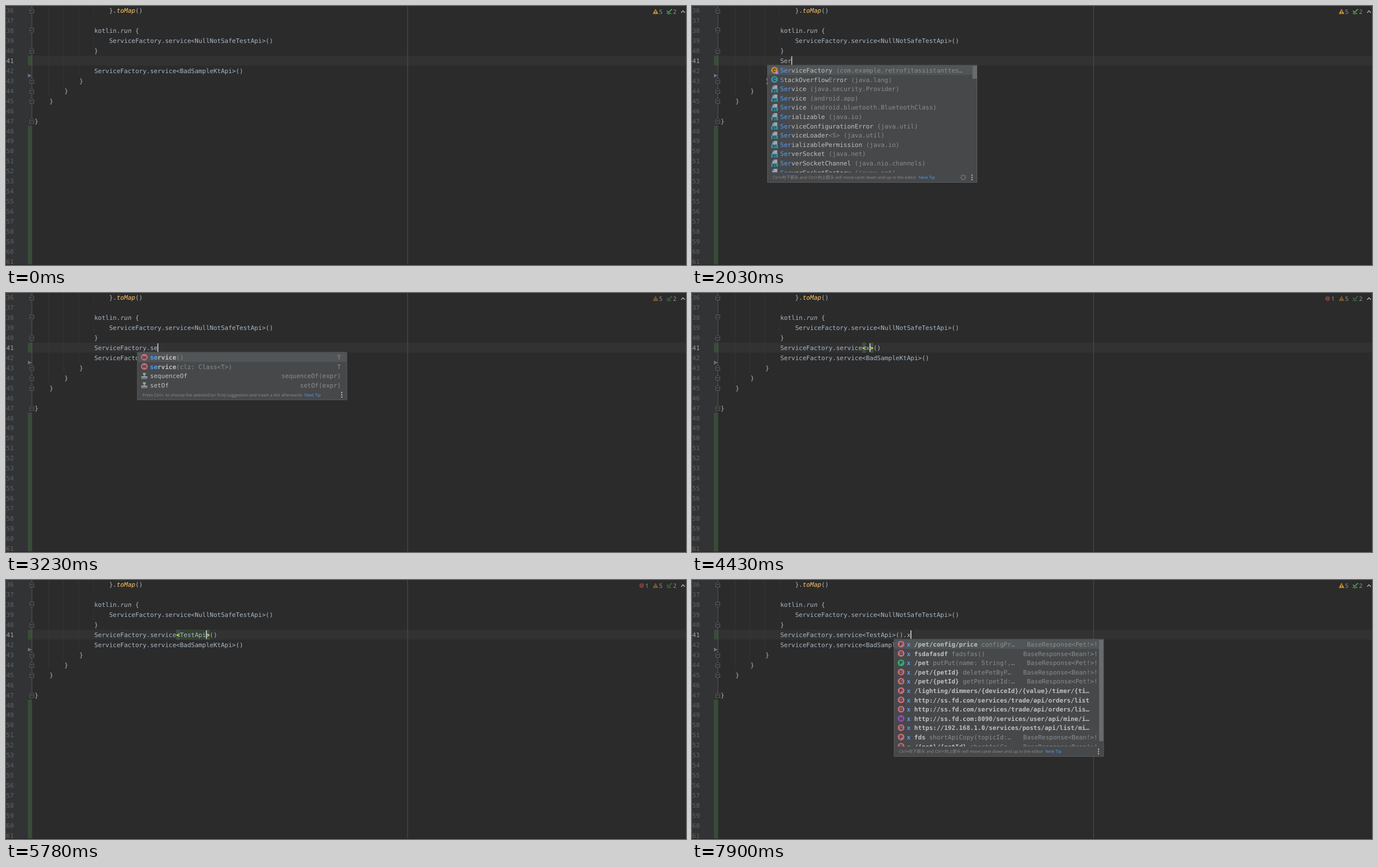
An HTML page with a canvas for the animation above (8 s loop, 1211x463 px).

```html
<!DOCTYPE html>
<html lang="en">
<head>
<meta charset="utf-8">
<title>Code completion</title>
<style>
html, body { margin: 0; width: 1211px; height: 463px; overflow: hidden; background: #2b2b2b; }
canvas { display: block; }
</style>
</head>
<body>
<canvas id="stage" width="1211" height="463"></canvas>
<script>
const ctx = document.getElementById('stage').getContext('2d');
const LOOP = 8000, CW = 6.636, LINE = 17.96, ROW = 16.6, LEFT = 51;
const MONO = '11.02px "DejaVu Sans Mono", "Liberation Mono", monospace';
const SANS = '"Open Sans", "Noto Sans CJK SC", "Noto Sans", sans-serif';
const CODE = '#a9b7c6', PINK = '#c06c7a', GREEN = '#32ab71', TEAL = '#3d8ea3', STEEL = '#9aa7b0';

const colX = col => LEFT + col * CW;
const lineY = n => 8 + (n - 36) * LINE;

function rect(x, y, w, h, color) {
  ctx.fillStyle = color;
  ctx.fillRect(x, y, w, h);
}

function text(s, x, y, color, font = MONO, align = 'left') {
  ctx.font = font;
  ctx.fillStyle = color;
  ctx.textAlign = align;
  ctx.fillText(s, x, y);
}

function path(points, stroke, fill, width = 1) {
  ctx.beginPath();
  points.forEach(([x, y]) => ctx.lineTo(x, y));
  if (fill) {
    ctx.closePath();
    ctx.fillStyle = fill;
    ctx.fill();
  }
  if (stroke) {
    ctx.strokeStyle = stroke;
    ctx.lineWidth = width;
    ctx.stroke();
  }
}

function disc(x, y, r, color) {
  ctx.beginPath();
  ctx.arc(x, y, r, 0, 7);
  ctx.fillStyle = color;
  ctx.fill();
}

// Popup rows: [icon, text, right text]; in text * marks a match, ~ grey, # bold.
const NAV_TIP = 'Ctrl+向下箭头 and Ctrl+向上箭头 will move caret down and up in the editor';
const DOT_TIP = 'Press Ctrl+. to choose the selected (or first) suggestion and insert a dot afterwards';

const classes = {
  x: 134.5, thumb: 23, tip: NAV_TIP,
  rows: [
    ['K', '*Ser*viceFactory ~(com.example.retrofitassistanttest)'],
    ['C', '*S*tackOverflow*Er*ror ~(java.lang)'],
    ...['vice ~(java.security.Provider)', 'vice ~(android.app)', 'vice ~(android.bluetooth.BluetoothClass)',
      'ializable ~(java.io)', 'viceConfigurationError ~(java.util)', 'viceLoader~<S> (java.util)',
      'ializablePermission ~(java.io)', 'verSocket ~(java.net)', 'verSocketChannel ~(java.nio.channels)',
      'verSocketFactory ~(javax.net)'].map(s => ['01', '*Ser*' + s])
  ]
};

const members = {
  x: 234, thumb: 100, tip: DOT_TIP,
  rows: [
    ['m', '#service#~()', 'T'], ['m', '#service#~(clz: Class<T>)', 'T'],
    ['m', 'equals~(other: Any?)', 'Boolean'], ['m', 'hashCode~()', 'Int'], ['m', 'toString~()', 'String'],
    ...['arg', 'listOf', 'return', 'sequenceOf', 'setOf', 'val', 'var'].map(s => ['t', s, s + '(expr)'])
  ]
};

const filtered = {
  x: 234, tip: DOT_TIP,
  rows: [
    ['m', '#*se*rvice#~()', 'T'], ['m', '#*se*rvice#~(clz: Class<T>)', 'T'],
    ['t', 'sequenceOf', 'sequenceOf(expr)'], ['t', 'setOf', 'setOf(expr)']
  ]
};

const fff = 'fff/{p}/{p1}/{p2} : BadSample';
const routes = [
  ['P', '/pet/config/price : TestApi'], ['P+', '/pet : TestApi'],
  ['G', '/pet/{petId} : TestApi'], ['D', '/pet/{petId} : TestApi'],
  ['D', '/{pet}/{petId} : TestApi'], ['G', '/pet/findByStatus : NullNotSafeTestApiKt'],
  ['G', 'ht?page={pageNo}&lastId={lastId}&{testQueryName}'], ['G', fff + 'JavaApi'],
  ['P', 'ht{@p}/{test} : BadSampleJavaApi'],
  ['G', fff + 'KtApi'], ['G', fff + 'KtApi'], ['G', fff + 'KtApi']
];

const routePopup = prefix => ({
  x: 287, tip: NAV_TIP,
  thumb: prefix.length < 3 ? 61 : 0,
  rows: routes.filter(r => r[1].includes(prefix)).map(([icon, s]) =>
    [icon, '*x* ' + (prefix ? s.replace(prefix, '*' + prefix + '*') : s) + '~(com.example.retrofitassistanttest)'])
});

const PET = 'BaseResponse<Pet!>!', BEAN = 'BaseResponse<Bean!>!', HOST = 'http://ss.fd.com';
const calls = {
  x: 360, thumb: 181, tip: NAV_TIP,
  rows: [
    ['P', '/pet/config/price#~ configPr…', PET],
    ['G', 'fsdafasdf#~ fadsfas()', BEAN],
    ['P+', '/pet#~ putPut(name: String!,…', PET],
    ['D', '/pet/{petId}#~ deletePetByP…', BEAN],
    ['G', '/pet/{petId}#~ getPet(petId:…', PET],
    ['P', '/lighting/dimmers/{deviceId}/{value}/timer/{time}'],
    ['G', HOST + '/services/trade/api/orders/list'],
    ['G', HOST + '/services/trade/api/orders/lists'],
    ['H', HOST + ':8090/services/user/api/mine/info'],
    ['G', 'https://192.168.1.0/services/posts/api/list/mine'],
    ['P', 'fds#~ shortApiCopy(topicId:…', BEAN],
    ['P', '/{pet}/{petId}#~ shortApiCo…', BEAN]
  ].map(([icon, s, right]) => [icon, '#*x* ' + s, right])
};

// Timeline: each step patches the state; ^ in code is the caret.
const SF = 'ServiceFactory', SERVICE = SF + '.service', TYPED = SERVICE + '<TestApi>';
const steps = [
  [0, { code: '' }],
  [1100, { code: '^' }],
  [1420, { code: 'S^' }],
  [1690, { code: 'Se^' }],
  [1760, { code: 'Ser^' }],
  [1960, { popup: classes, busy: true }],
  [2090, { busy: false }],
  [2550, { code: SF + '^', popup: null }],
  [2620, { dim: true, usages: true }],
  [2820, { code: SF + '.^', usages: false }],
  [2950, { popup: members }],
  [3090, { code: SF + '.s^' }],
  [3160, { code: SF + '.se^' }],
  [3230, { popup: filtered }],
  [3420, { code: SERVICE + '<^>()', pair: [22, 23], popup: null }],
  [3970, { blink: true }],
  [4100, { error: true }],
  [4430, { code: SERVICE + '<x^>()', pair: [22, 24], blink: false }],
  [4630, { popup: routePopup('') }],
  [4830, { code: SERVICE + '<xp^>()', pair: [22, 25] }],
  [4890, { popup: routePopup('p') }],
  [4960, { code: SERVICE + '<xpe^>()', pair: [22, 26] }],
  [5030, { code: SERVICE + '<xpet^>()', pair: [22, 27] }],
  [5100, { popup: routePopup('pet'), busy: true }],
  [5370, { busy: false }],
  [5650, { code: SERVICE + '<TestApi^>()', pair: null, popup: null }],
  [5780, { pair: [22, 30], type: true }],
  [6110, { code: TYPED + '^()' }],
  [6230, { type: false }],
  [6380, { code: TYPED + '(^)', pair: [31, 32] }],
  [6510, { code: TYPED + '()^' }],
  [7100, { blink: true }],
  [7170, { error: false, dim: false }],
  [7370, { code: TYPED + '().^', blink: false }],
  [7440, { pair: null }],
  [7580, { code: TYPED + '().x^' }],
  [7640, { popup: calls }]
];

const stateAt = t => Object.assign({}, ...steps.filter(s => s[0] <= t).map(s => s[1]));

function foldMark(n, opens) {
  const y = lineY(n), d = opens ? 1 : -1;
  path([[42.5, y - 4.5 * d], [49.5, y - 4.5 * d], [49.5, y + 2 * d], [46, y + 5 * d], [42.5, y + 2 * d], [42.5, y - 4.5 * d]],
    '#5e6062', '#2b2b2b');
  path([[44.2, y], [47.8, y]], '#77797b');
}

function drawGutter() {
  rect(0, 0, 46, 463, '#313335');
  rect(39, 88.8, 7.5, 17.7, '#384c38');
  rect(39, 214, 7.5, 249, '#384c38');
  rect(45.6, 0, 1, 205, '#555759');
  for (let n = 36; n <= 61; n++) text(n, 13.8, lineY(n) + 4, n === 41 ? '#a4a3a3' : '#606366', MONO, 'right');
  [36, 40, 43, 44, 45, 47].forEach(n => foldMark(n, false));
  foldMark(38, true);
  path([[39, 121], [46, 124.5], [39, 128]], null, '#6b6c80');
}

function drawCode(s) {
  rect(46.5, 88.8, 1165, 17.8, '#323232');
  const guide = (col, top, bottom) => rect(colX(col) - 1.8, top, 1, bottom - top, '#373737');
  [[4, 0, 160], [8, 0, 142], [12, 0, 124], [16, 0, 16], [16, 53, 71]].forEach(g => guide(...g));
  rect(714.7, 0, 1, 463, '#505050');

  const mark = (n, col, len, color) => rect(colX(col), lineY(n) - 9, len * CW, 18, color);
  if (s.usages) [[39, 20], [41, 16], [42, 16]].forEach(([n, col]) => mark(n, col, 14, '#344134'));
  if (s.type) mark(41, 39, 7, '#344134');
  if (s.pair) s.pair.forEach(i => mark(41, 16 + i, 1, '#3b514d'));

  const put = (n, col, str, color = CODE, style = '') => text(str, colX(col), lineY(n) + 4, color, style + MONO);
  put(36, 20, '}.');
  put(36, 22, 'toMap', '#ffc66d', 'italic ');
  put(36, 27, '()');
  put(38, 16, 'kotlin.');
  put(38, 23, 'run', CODE, 'italic ');
  put(38, 27, '{');
  put(39, 20, SERVICE + '<NullNotSafeTestApi>()');
  put(42, 16, SERVICE + '<BadSampleKtApi>()');
  [[40, 16], [43, 12], [44, 8], [45, 4], [47, 0]].forEach(([n, col]) => put(n, col, '}'));

  const code = s.code.replace('^', ''), caret = s.code.indexOf('^'), pair = s.pair || [];
  put(41, 16, [...code].map((c, i) => pair.includes(i) ? ' ' : c).join(''));
  pair.forEach(i => put(41, 16 + i, code[i], '#ffef28', 'bold '));
  if (caret >= 0 && !s.blink) rect(colX(16 + caret) - 0.3, 90, 1.6, 15.3, '#d0d0d0');
}

function drawStatus(s) {
  const num = (n, x) => text(n, x, 14, '#9c9c9c', '10.5px ' + SANS);
  ctx.globalAlpha = s.dim ? 0.5 : 1;
  path([[1156.7, 5], [1161.7, 14.2], [1151.7, 14.2]], null, '#c4902f');
  rect(1156.1, 8, 1.2, 3.2, '#2b2b2b');
  rect(1156.1, 12, 1.2, 1.2, '#2b2b2b');
  path([[1177, 8.5], [1180, 11.5], [1186, 5.5]], '#499c54', null, 1.8);
  path([[1176.5, 14], [1178.5, 12.6], [1180.5, 14.6], [1182.5, 12.6], [1185, 14.2]], '#499c54', null, 1.2);
  if (s.error) {
    disc(1132, 10, 4.3, '#c75450');
    rect(1131.4, 7.3, 1.2, 3.3, '#2b2b2b');
    rect(1131.4, 11.5, 1.2, 1.2, '#2b2b2b');
  }
  ctx.globalAlpha = 1;
  if (s.error) num(1, 1138.4);
  num(5, 1163);
  num(2, 1188);
  path([[1202.5, 12], [1205.7, 8.5], [1209, 12]], '#bcbcbc', null, 1.2);
}

function drawIcon(kind, x, y) {
  if (kind === '01') {
    path([[x - 1, y - 6.5], [x + 5, y - 6.5], [x + 5, y], [x - 4, y], [x - 4, y - 3.2], [x - 1, y - 3.2]], null, STEEL);
    path([[x - 4, y - 3.7], [x - 1.5, y - 3.7], [x - 1.5, y - 6.3]], null, STEEL);
    rect(x - 6, y, 12, 6.3, TEAL);
    text('01', x, y + 5.6, '#20353b', 'bold 6.5px ' + SANS, 'center');
  } else if (kind === 't') {
    rect(x - 2.5, y - 5.2, 5, 3.2, STEEL);
    rect(x - 1, y - 2, 2, 3, STEEL);
    rect(x - 5.5, y + 0.8, 11, 2.2, STEEL);
    rect(x - 5.5, y + 4, 11, 1.1, STEEL);
  } else {
    const color = { K: '#bd873d', C: TEAL, 'P+': GREEN, H: '#9050b0' }[kind] || PINK;
    disc(x, y - 0.3, 6, color);
    text(kind === 'K' ? 'C' : kind[0], x, y + 2.8, '#322d30', 'bold 8.8px Roboto, sans-serif', 'center');
    if (kind === 'K') rect(x + 1.5, y + 1.5, 5, 5, '#a58be0');
  }
}

function drawMarkup(str, x, y, max = 49) {
  const plain = str.replace(/[*~#]/g, ''), cut = plain.length > max;
  let n = 0, match = false, grey = false, bold = false;
  for (const part of str.split(/([*~#])/)) {
    if (part === '*') match = !match;
    else if (part === '~') grey = !grey;
    else if (part === '#') bold = !bold;
    else {
      let run = part;
      if (cut && n + run.length >= max) run = n < max ? run.slice(0, max - 1 - n) + '…' : '';
      text(run, x + n * CW, y, match ? '#589df6' : grey ? '#8c8c8c' : '#c0c0c0', (bold ? 'bold ' : '') + MONO);
      n += run.length;
    }
  }
}

function drawPopup({ x, rows, thumb, tip }, busy) {
  const top = 106, width = 373, listH = 0.5 + Math.min(rows.length, 11.5) * ROW, bottom = top + listH;
  rect(x - 0.5, top - 0.5, width + 1, listH + 19, '#5b5d5f');
  rect(x + 0.5, top + 0.5, width - 1, listH + 17, '#46484a');
  ctx.save();
  ctx.beginPath();
  ctx.rect(x, top, width, listH);
  ctx.clip();
  rect(x + 0.5, top + 0.5, width - 1, ROW, '#515557');
  rows.forEach(([icon, str, right], i) => {
    const y = 115 + i * ROW;
    drawIcon(icon, x + 12.4, y);
    drawMarkup(str, x + 22.6, y + 4);
    if (right) text(right, x + 362.5, y + 4, '#8c8c8c', MONO, 'right');
  });
  if (thumb) rect(x + 365, top + 1, 7.5, thumb, '#696b6d');
  ctx.restore();

  const y = bottom + 9, font = '7.47px ' + SANS;
  text(tip, x + 9, y + 2.7, '#8c8c8c', font);
  text('Next Tip', x + 13 + ctx.measureText(tip).width, y + 2.7, '#589df6', font);
  for (let i = -1; i < 2; i++) rect(x + 363, y - 1 + i * 4, 2, 2, '#c4c4c4');
  if (busy) {
    for (let a = 0; a < 8; a++) {
      const c = Math.cos(a * Math.PI / 4), d = Math.sin(a * Math.PI / 4), cx = x + 348.5;
      path([[cx + 2.6 * c, y + 2.6 * d], [cx + 5.3 * c, y + 5.3 * d]], '#8a8c8e', null, 1.2);
    }
  }
}

function frame(now) {
  const s = stateAt(now % LOOP);
  ctx.textRendering = 'geometricPrecision';
  rect(0, 0, 1211, 463, '#2b2b2b');
  drawCode(s);
  drawGutter();
  drawStatus(s);
  if (s.popup) drawPopup(s.popup, s.busy);
  rect(0, 462, 1211, 1, '#242526');
  requestAnimationFrame(frame);
}

let start;
requestAnimationFrame(() => {
  start = performance.now();
  const tick = () => frame(performance.now() - start);
  const schedule = window.requestAnimationFrame.bind(window);
  window.requestAnimationFrame = () => schedule(tick);
  tick();
});
</script>
</body>
</html>
```
